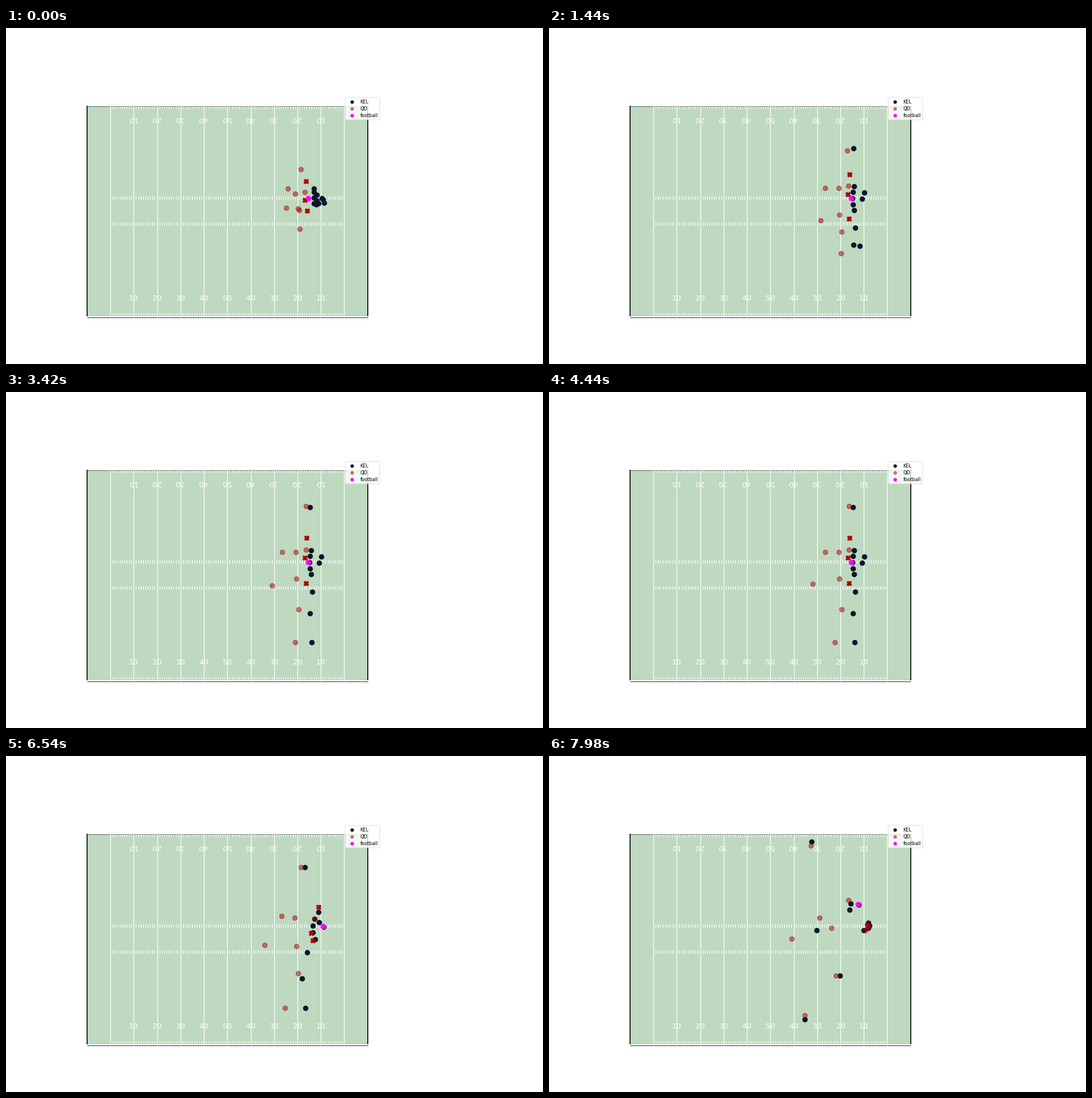
A matplotlib script for the animation above (8 s loop, 947 px wide and 592 px high).

```python
import numpy as np
import matplotlib.pyplot as plt
from matplotlib.animation import FuncAnimation
from matplotlib.patches import FancyBboxPatch, Rectangle

W, H, DPI = 947, 592, 64
K = 59.2 / DPI              # point scale of the 16 x 10 inch layout
STEP, FRAMES, INTERVAL = 60, 200, 40
SNAP, PIVOT, END = 5600, 6540, 7980

NAVY, RED, PINK = "#0b162a", "#aa0000", "magenta"
GRASS = "#bed9c0"
LEFT, TOP, BOTTOM, YARD = 143.3, 138.2, 510.3, 4.123


def blend(a, b, u):
    return a + (b - a) * u


def smooth(u):
    u = min(max(u, 0), 1)
    return u * u * (3 - 2 * u)


class Player:
    """Walks to a ready spot, may shift until the snap, then runs a route."""

    def __init__(self, start, ready, finish, via=None, shift=None,
                 base=600, rate=15, power=2.2):
        self.start, self.ready, self.finish = map(np.array, (start, ready, finish))
        self.via = None if via is None else np.array(via)
        self.shift = self.ready if shift is None else np.array(shift)
        self.arrive = base + rate * np.hypot(*(self.ready - self.start))
        self.power = power

    def at(self, t):
        if t < self.arrive:
            return blend(self.start, self.ready, smooth(t / self.arrive))
        if t < SNAP:
            u = (t - self.arrive) / (SNAP - self.arrive)
            return blend(self.ready, self.shift, u)
        if self.via is None:
            u = (t - SNAP) / (END - SNAP)
            return blend(self.shift, self.finish, u ** self.power)
        if t < PIVOT:
            u = (t - SNAP) / (PIVOT - SNAP)
            return blend(self.shift, self.via, u ** 1.5)
        return blend(self.via, self.finish, (t - PIVOT) / (END - PIVOT))


def lineman(i):
    """Blocker i of -2..2, counted from the center; the outer one leaks out."""
    start = (543 + 5 * (i % 2), 300 + 5 * i)
    ready = (535 + 1.9 * abs(i), 300.6 + 10.7 * i)
    pocket = (541.5 + 1.7 * i * i - 1.6 * i, 300 + 12 * i)
    pile = (565.5 - 2.4 * i * i, 299.3 + 4.3 * i)
    return Player(start, ready, (532.5, 261) if i == -2 else pile, pocket)


passer = Player((557.5, 301), (552.8, 301.4), (546.5, 262.5), via=(560, 301.5))
offense = [lineman(i) for i in range(-2, 3)] + [
    passer,
    Player((559, 303), (556.7, 290.5), (530.5, 272), via=(552.5, 293.5)),
    Player((543.5, 284), (536.7, 203.3), (463, 151.5)),
    Player((551, 310), (540.2, 352.5), (472, 308)),
    Player((547.5, 312), (536.4, 391), (513, 388), via=(522.5, 393)),
    Player((561, 308.5), (539.8, 441.7), (451.5, 465)),
]

SLOW = dict(base=1500, rate=16)
rushers = [
    Player((529, 271), (530.6, 258), (528, 255), via=(551, 267), **SLOW),
    Player((527, 304), (527.7, 293), (562.5, 300), via=(538, 312.5), **SLOW),
    Player((531, 323), (529.5, 337.5), (558.5, 307.5), power=1, **SLOW),
]
coverage = [
    Player((527, 290), (529, 278.2), (561, 298), power=0.8, **SLOW),
    Player((520, 250), (529.2, 201.8), (462.5, 159), **SLOW),
    Player((497, 284), (487.3, 282.2), (477.5, 286), **SLOW),
    Player((510, 292.5), (511.4, 282.3), (498.5, 303.5), **SLOW),
    Player((494, 318), (476, 345.5), (428.3, 322.5), shift=(460.3, 335), **SLOW),
    Player((515, 319), (512.3, 329.7), (563.5, 303.5), via=(512.5, 335.5), **SLOW),
    Player((517, 321.7), (516.5, 383.3), (506.5, 388), **SLOW),
    Player((518, 354.3), (513.5, 441), (451, 457.5), shift=(498.3, 442), **SLOW),
]
defense = rushers + coverage


def spots(players, t):
    return np.array([p.at(t) for p in players])


def ball_at(t):
    caught = smooth((t - SNAP + 60) / 600)
    return blend(np.array([533.5, 300.8]), passer.at(t) - [0.7, 0.5], caught)


def rushing(t):
    """Which defenders are marked with a cross at time t."""
    mask = np.zeros(len(defense), bool)
    mask[0] = mask[2] = t < 7200
    mask[1] = not 1600 < t < 2700
    return mask


fig = plt.figure(figsize=(W / DPI, H / DPI), dpi=DPI, facecolor="white")
ax = fig.add_axes([0, 0, 1, 1])
ax.set_xlim(0.4, W + 0.4)
ax.set_ylim(H + 0.5, 0.5)
ax.axis("off")


def yard(n):
    return LEFT + YARD * n


def rule(xs, ys, color, width, z):
    ax.plot(xs, ys, color=color, lw=width * K, zorder=z, solid_capstyle="butt")


def draw_field():
    right = yard(120)
    ax.add_patch(Rectangle((LEFT, TOP), right - LEFT, BOTTOM - 1.5 - TOP,
                           fc=GRASS, ec="none", zorder=0))
    rule([LEFT, right], [TOP, TOP], "#56685a", 1.2, 1)
    rule([LEFT, right], [BOTTOM, BOTTOM], "#222222", 1.2, 1)
    rule([LEFT, right], [BOTTOM - 2] * 2, "white", 1.5, 1)
    for x in (LEFT + 0.5, right):
        rule([x, x], [TOP - 0.5, BOTTOM - 2], "black", 2, 1)
    for n in range(10, 111, 10):
        rule([yard(n)] * 2, [TOP - 0.5, BOTTOM + 0.2], "white", 1.5, 2)
    ticks = [yard(n) for n in range(11, 110)]
    for y0, y1 in ((138.7, 143), (296.7, 302.5), (343, 348.7), (502.5, 506.5)):
        ax.vlines(ticks, y0, y1, color="white", lw=1.5 * K, zorder=2)
    for n in range(20, 101, 10):
        label = str(50 - abs(n - 60))
        style = dict(color="white", fontsize=16 * K, ha="center", va="baseline",
                     rotation_mode="anchor", zorder=3)
        ax.text(yard(n), 481, label, **style)
        ax.text(yard(n) - 2, 157.8, label, rotation=180, **style)


def draw_legend():
    ax.add_patch(FancyBboxPatch((600.4, 125), 57, 35.4,
                                boxstyle="round,pad=2,rounding_size=1.6",
                                fc="white", ec="#cccccc", alpha=0.8,
                                lw=K, zorder=8))
    rows = (("KEL", NAVY, 1), ("QD", RED, 0.5), ("football", PINK, 1))
    for i, (label, color, alpha) in enumerate(rows):
        y = 130.5 + 12.2 * i
        ax.scatter(610, y, s=36 * K * K, color=color, alpha=alpha,
                   lw=1.5 * K, zorder=9)
        ax.text(624.9, y + 2.7, label, fontsize=10 * K, color="black",
                va="baseline", zorder=9)


def dots(color, z, alpha=1, marker="o"):
    return ax.scatter([], [], s=100 * K * K, color=color, alpha=alpha,
                      marker=marker, lw=1.5 * K, zorder=z)


draw_field()
draw_legend()

offense_dots = dots(NAVY, 4)
defense_dots = dots(RED, 5, 0.5)
rush_marks = dots(RED, 6, marker="X")
ball_dot = dots(PINK, 7)


def update(i):
    t = (i * INTERVAL + STEP // 3) // STEP * STEP
    where, rush = spots(defense, t), rushing(t)
    offense_dots.set_offsets(spots(offense, t))
    defense_dots.set_offsets(where[~rush])
    rush_marks.set_offsets(where[rush])
    ball_dot.set_offsets(ball_at(t))
    return offense_dots, defense_dots, rush_marks, ball_dot


anim = FuncAnimation(fig, update, frames=FRAMES, interval=INTERVAL,
                     init_func=lambda: update(0), repeat=True, repeat_delay=0)
plt.show()
```
